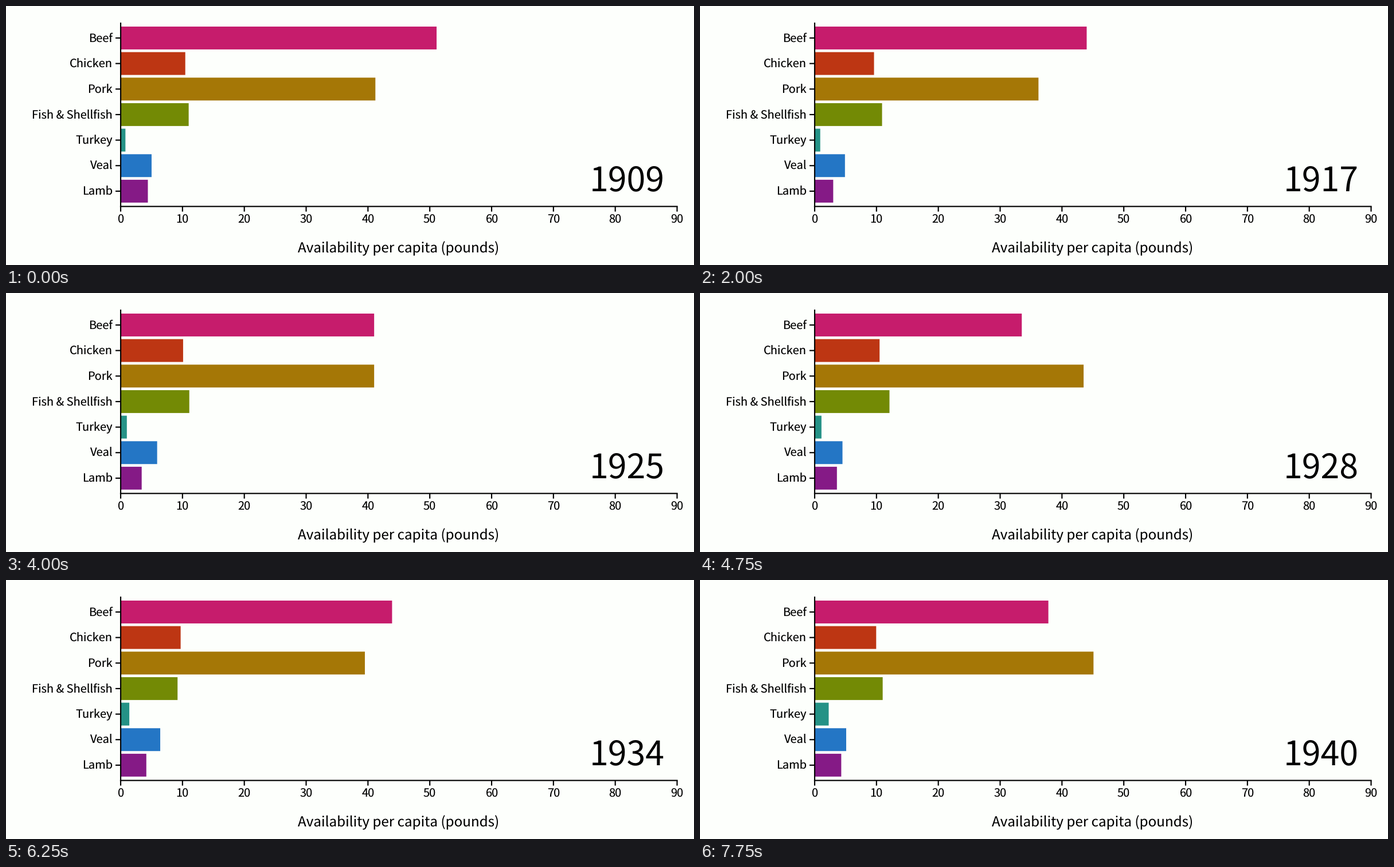
A matplotlib script that plays this animation: 1200x453 px, repeating every 8 s.

```python
import numpy as np
import matplotlib.pyplot as plt
from matplotlib.animation import FuncAnimation
from matplotlib.patches import Rectangle

W, H, DPI = 1200, 453, 96
FIRST_YEAR, YEARS = 1909, 32
X0, Y0 = 200, 350.6          # axis origin in pixels
UNIT = 970.5 / 90            # pixels per pound
TOP, STEP, BAR_H = 36, 44.65, 39.95
LINE_W = 2.15

plt.rcParams["font.family"] = "Noto Sans CJK JP"
plt.rcParams["text.hinting"] = "none"

# Pounds at a few key years; the years between are interpolated.
KEY_YEARS = [1909, 1914, 1917, 1921, 1925, 1928, 1931, 1934, 1936, 1940]
SERIES = [
    ("Beef", "#c61c6c",
     [51.1, 42.7, 44, 38.25, 41, 33.5, 33.5, 43.9, 41.6, 37.8]),
    ("Chicken", "#bd3613",
     [10.45, 10.3, 9.6, 9.45, 10.1, 10.5, 10, 9.7, 9.6, 9.95]),
    ("Pork", "#a57706",
     [41.2, 40, 36.2, 39.8, 41, 43.5, 41.9, 39.5, 33.8, 45.1]),
    ("Fish & Shellfish", "#738a05",
     [11, 11.7, 10.9, 10.5, 11.1, 12.1, 8.85, 9.2, 11.6, 11]),
    ("Turkey", "#259286",
     [0.77, 0.87, 0.9, 1, 1, 1.1, 1.1, 1.4, 1.7, 2.27]),
    ("Veal", "#2476c5",
     [5, 4, 4.9, 5.2, 5.9, 4.5, 4.55, 6.4, 5.75, 5.1]),
    ("Lamb", "#851a86",
     [4.4, 4.7, 3, 4, 3.4, 3.6, 4.7, 4.15, 4.35, 4.3]),
]

fig = plt.figure(figsize=(W / DPI, H / DPI), dpi=DPI, facecolor="#fdfffc")
ax = fig.add_axes([0, 0, 1, 1])
ax.set_xlim(0, W)
ax.set_ylim(H, 0)
ax.axis("off")


def px(size):
    return size * 72 / DPI


def bar_width(values, year):
    return np.interp(year, KEY_YEARS, values) * UNIT


def line(xs, ys):
    ax.plot(xs, ys, color="black", lw=px(LINE_W), solid_capstyle="butt",
            snap=False, zorder=3)


def label(x, y, text, size, ha="center"):
    return ax.text(x, y, text, fontsize=px(size), color="black",
                   ha=ha, va="baseline", zorder=4)


bars = []
for i, (name, color, values) in enumerate(SERIES):
    top = TOP + i * STEP
    mid = top + BAR_H / 2
    bar = Rectangle((X0, top), bar_width(values, FIRST_YEAR), BAR_H,
                    facecolor=color, linewidth=0, snap=False)
    bars.append(ax.add_patch(bar))
    line([X0 - 9, X0], [mid, mid])
    label(186, mid + 7, name, 20, "right")

for pounds in range(0, 91, 10):
    x = X0 + pounds * UNIT
    line([x, x], [Y0, Y0 + 9])
    label(x, 380, str(pounds), 20)

line([X0, X0], [29, Y0 + LINE_W / 2])
line([X0 - LINE_W / 2, X0 + 90 * UNIT + LINE_W / 2], [Y0, Y0])
label(684.75, 431, "Availability per capita (pounds)", 24.2)
counter = label(1018, 323, str(FIRST_YEAR), 59, "left")


def update(frame):
    year = FIRST_YEAR + frame
    for bar, (_, _, values) in zip(bars, SERIES):
        bar.set_width(bar_width(values, year))
    counter.set_text(str(year))
    return bars + [counter]


anim = FuncAnimation(fig, update, frames=YEARS, interval=250,
                     repeat=True, repeat_delay=0, blit=False)
plt.show()
```
